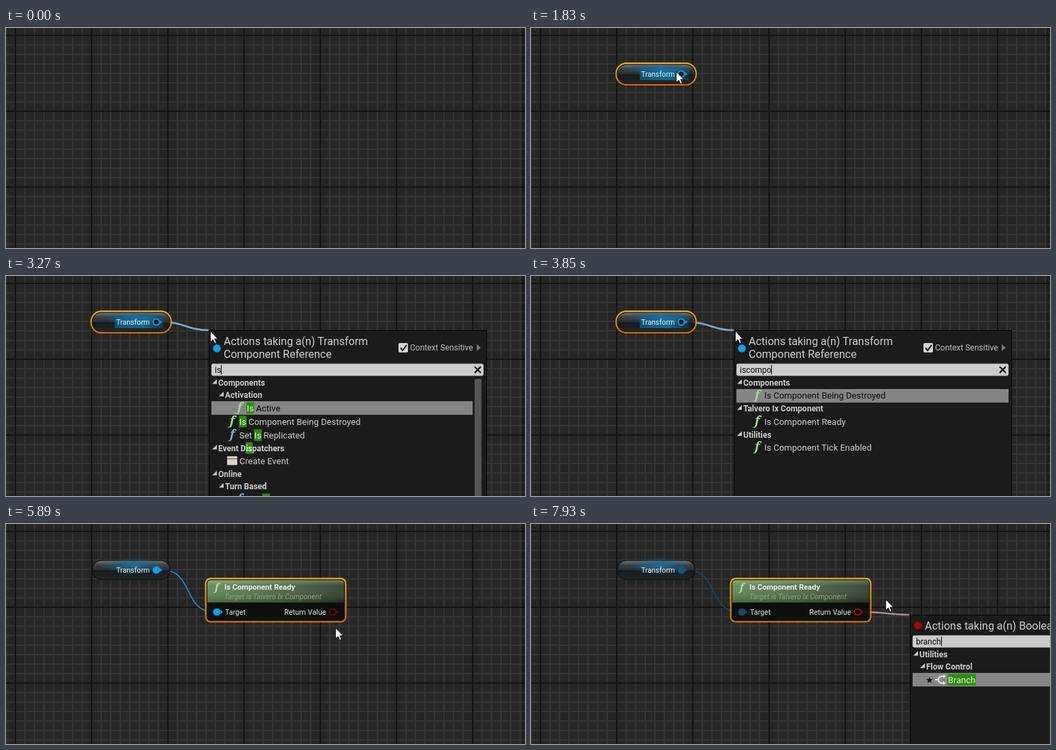
Write an HTML page that moves like this. It is 763 px wide and 325 px high and loops after 8000 ms.

```html
<!DOCTYPE html>
<html lang="en">
<head>
<meta charset="utf-8">
<title>Node graph</title>
<style>
  html, body { margin: 0; width: 100%; height: 100%; overflow: hidden; background: #262626; }
  svg { display: block; font-family: Roboto, sans-serif; }
</style>
</head>
<body>
<svg width="763" height="325" viewBox="0 0 763 325">
  <defs>
    <pattern id="minor" width="14" height="14" patternUnits="userSpaceOnUse" x="-1" y="-4">
      <path d="M1 0V14M0 1H14" stroke="#343434" stroke-width="2"/>
    </pattern>
    <pattern id="major" width="112" height="112" patternUnits="userSpaceOnUse" x="13" y="10">
      <path d="M1 0V112M0 1H112" stroke="#141414" stroke-width="2"/>
    </pattern>
    <linearGradient id="edge" x2="0" y2="1">
      <stop stop-color="#f5ac14"/><stop offset="1" stop-color="#cf6a08"/>
    </linearGradient>
    <linearGradient id="pill" x2="0" y2="1">
      <stop stop-color="#78838a"/><stop offset=".22" stop-color="#3c454a"/>
      <stop offset=".5" stop-color="#272d31"/><stop offset=".52" stop-color="#14181b"/>
      <stop offset="1" stop-color="#23282b"/>
    </linearGradient>
    <radialGradient id="glow">
      <stop stop-color="#1583bb" stop-opacity=".85"/><stop offset=".55" stop-color="#126a9a" stop-opacity=".5"/>
      <stop offset="1" stop-color="#0f5c88" stop-opacity="0"/>
    </radialGradient>
    <linearGradient id="band">
      <stop stop-color="#0f5f8c" stop-opacity=".75"/><stop offset=".6" stop-color="#1279ad" stop-opacity=".8"/>
      <stop offset="1" stop-color="#0e5a84" stop-opacity=".3"/>
    </linearGradient>
    <linearGradient id="head">
      <stop stop-color="#5d8a58"/><stop offset=".5" stop-color="#4a6a45"/><stop offset="1" stop-color="#2f3d2c"/>
    </linearGradient>
    <linearGradient id="gloss" x2="0" y2="1">
      <stop stop-color="#fff" stop-opacity=".28"/><stop offset=".25" stop-color="#fff" stop-opacity=".06"/>
      <stop offset="1" stop-color="#000" stop-opacity=".22"/>
    </linearGradient>
  </defs>
  <rect width="763" height="325" fill="#262626"/>
  <rect width="763" height="325" fill="url(#minor)"/>
  <rect width="763" height="325" fill="url(#major)"/>
  <rect x="758" width="5" height="325" opacity=".2"/>
  <g id="scene"></g>
</svg>
<script>
const LOOP = 8000;
const scene = document.getElementById('scene');
const pen = document.createElement('canvas').getContext('2d');

const HEAD = 'head', FOLDED = 'folded', GREEN = '#9fdc92', BLUE = '#74b4e6';
// rows: [level, kind, label]
const allActions = ['Activation', 'Collision', 'Components', 'Event Dispatchers', 'Online',
  'Talvero Ix Component', 'Tags', 'Utilities', 'Variables'].map(name => [0, FOLDED, name]);
const isActions = [
  [0, HEAD, 'Components'], [1, HEAD, 'Activation'], [2, GREEN, 'Is Active'],
  [1, GREEN, 'Is Component Being Destroyed'], [1, BLUE, 'Set Is Replicated'],
  [0, HEAD, 'Event Dispatchers'], [1, 'event', 'Create Event'],
  [0, HEAD, 'Online'], [1, HEAD, 'Turn Based'], [2, BLUE, 'Get Is My Turn']];
const componentActions = [
  [0, HEAD, 'Components'], [1, GREEN, 'Is Component Being Destroyed'],
  [0, HEAD, 'Talvero Ix Component'], [1, GREEN, 'Is Component Ready'],
  [0, HEAD, 'Utilities'], [1, GREEN, 'Is Component Tick Enabled']];
const boolActions = ['Add Event', 'Math', 'Utilities', 'Variables'].map(name => [0, FOLDED, name]);
const branchActions = [[0, HEAD, 'Utilities'], [1, HEAD, 'Flow Control'], [2, 'branch', 'Branch']];

const objectMenu = { x: 298, y: 80, dot: '#0ba1ee', title: ['Actions taking a(n) Transform', 'Component Reference'] };
const boolMenu = { x: 557, y: 134, dot: '#a50505', title: ['Actions taking a(n) Boolean'] };
const NEW_NODE = { label: 'Place a new node.', width: 129, color: '#d8d6d0' };
const VARIABLE = { label: 'Transform', width: 96, color: '#0ba1ee' };

const find = (rows, query, selected, scroll = false) => ({ rows, query, selected, scroll, caret: true });
const pull = (x, y) => ({ cursor: [x, y], wire: [x, y], tip: NEW_NODE });

// Each step changes part of the state left by the steps before it.
const steps = [
  [0, {}],
  [390, { cursor: [111, 74], tip: VARIABLE }],
  [590, { cursor: [115, 66] }],
  [790, { cursor: [118, 58] }],
  [1010, { cursor: null, tip: null }],
  [1410, { getter: true, cursor: [150, 46] }],
  [1610, { cursor: [200, 58] }],
  [1830, { cursor: [213, 64] }],
  [2030, pull(246, 71)],
  [2230, pull(298, 80)],
  [2430, { menu: objectMenu, tip: null, cursor: null, search: find(allActions, '', -1) }],
  [2630, { cursor: [300, 81] }],
  [3050, { search: find(isActions, 'i', 2, true) }],
  [3270, { search: find(isActions, 'is', 2, true) }],
  [3450, { search: find(componentActions, 'isc', 1) }],
  [3650, { search: find(componentActions, 'iscom', 1) }],
  [3850, { search: find(componentActions, 'iscompo', 1) }],
  [4270, { search: { ...find(componentActions, 'iscompo', 1), caret: false } }],
  [4670, { search: find(componentActions, 'iscompo', 1) }],
  [4870, { search: find(componentActions, 'iscompo', 3) }],
  [5070, { menu: null, wire: null, check: true, fresh: true }],
  [5270, { fresh: false }],
  [5890, { cursor: [484, 153] }],
  [6090, { cursor: [480, 129] }],
  [6310, pull(508, 131)],
  [6510, pull(540, 133)],
  [6710, pull(556, 134)],
  [6910, { menu: boolMenu, tip: null, cursor: null, search: find(boolActions, '', -1) }],
  [7110, { cursor: [521, 111] }],
  [7310, { search: find(branchActions, 'br', 2) }],
  [7530, { search: find(branchActions, 'bran', 2) }],
  [7730, { search: find(branchActions, 'branc', 2) }],
  [7930, { search: find(branchActions, 'branch', 2) }],
];

const rect = (x, y, w, h, fill, more = '') =>
  `<rect x="${x}" y="${y}" width="${w}" height="${h}" fill="${fill}" ${more}/>`;
const path = (d, more) => `<path d="${d}" ${more}/>`;
const text = (x, y, label, size, fill, more = '') =>
  `<text x="${x}" y="${y}" font-size="${size}" fill="${fill}" ${more}>${label}</text>`;
const glyph = (x, y, size, fill) =>
  text(x, y, 'f', size, fill, 'font-family="Noto Serif, serif" font-style="italic" font-weight="600"');

function widthOf(label, size, weight = 400) {
  pen.font = `${weight} ${size}px Roboto, sans-serif`;
  return pen.measureText(label).width;
}

function pin(x, y, color, filled) {
  return `<circle cx="${x}" cy="${y}" r="${filled ? 5.5 : 4.5}" fill="${filled ? color : '#0a0c0d'}"
    stroke="${color}" stroke-width="${filled ? 0 : 2}"/>` +
    path(`M${x + 5.5} ${y - 3}L${x + 9} ${y}L${x + 5.5} ${y + 3}Z`, `fill="${color}"`);
}

function drawGetter({ check, wire }) {
  const selected = !check;
  const color = check && wire ? '#11577c' : '#0b9fe8';
  return rect(127, 54, 114, 28, 'url(#pill)', 'rx="13" stroke="#0a0a0a" fill-opacity=".93"') +
    '<ellipse cx="188" cy="62" rx="46" ry="13" fill="url(#glow)" opacity=".8"/>' +
    (selected ? rect(160, 60, 72, 17, 'url(#band)') +
      rect(125.2, 52.2, 117.6, 31.6, 'none', 'rx="15" stroke="url(#edge)" stroke-width="2.2"') : '') +
    text(162, 72, 'Transform', 10.7, '#eef2f4') + pin(221, 68, color, check);
}

function drawCheck({ wire }) {
  return rect(295, 82, 203, 61, '#0b0e0b', 'rx="6" fill-opacity=".92"') +
    ['url(#head)', 'url(#gloss)'].map(fill => path('M296 116V88Q296 83 301 83H492Q497 83 497 88V116Z', `fill="${fill}"`)).join('') +
    rect(293.6, 80.6, 205.8, 63.8, 'none', 'rx="7" stroke="url(#edge)" stroke-width="2.2"') +
    glyph(307, 98, 15, '#b9d8b0') +
    text(321, 97, 'Is Component Ready', 11.2, '#f0f2ee', 'font-weight="700"') +
    text(321, 111, 'Target is Talvero Ix Component', 10.7, '#93a373', 'font-style="italic"') +
    pin(310, 130, wire ? '#114a69' : '#0b9fe8', true) +
    text(322, 134, 'Target', 10.7, '#e4e6e4') +
    text(409, 134, 'Return Value', 10.9, '#e4e6e4') +
    pin(480, 130, wire ? '#a50808' : '#5e0b08', false);
}

function drawWires({ check, fresh, wire }) {
  let out = '';
  if (check) out += path('M230 68C276 68 260 130 306 130',
    `fill="none" stroke="${wire ? '#164a66' : '#1a93d4'}" stroke-width="${fresh ? 2.6 : 1.6}"`);
  if (wire) {
    const [x, y] = wire, x0 = check ? 489 : 230, y0 = check ? 130 : 68, bend = (x - x0) * .45;
    out += path(`M${x0} ${y0}C${x0 + bend} ${y0} ${x - bend} ${y} ${x} ${y}`,
      `fill="none" stroke="${check ? '#ad8a8d' : '#7fa9ca'}" stroke-width="2.6"`);
  }
  return out;
}

function drawTip({ tip, cursor: [x, y] }) {
  const left = x + 15, top = y + 15;
  return rect(left + .5, top + .5, tip.width - 1, 25, '#151515', 'stroke="#000"') +
    rect(left + 11, top + 6, 15, 14, tip.color, 'rx="3"') +
    rect(left + 11, top + 6, 15, 4, '#fff', 'rx="2" opacity=".4"') +
    text(left + 29, top + 17, tip.label, 12, '#d6d6d6');
}

function rowIcon(kind, x, y) {
  if (kind === 'event') return rect(x - 18, y - 7, 15, 13, '#d9d5c4', 'rx="1"') + rect(x - 18, y - 4, 15, 1.5, '#77736a');
  if (kind === 'branch') return text(x - 33, y + 5, '★', 13, '#111', 'font-family="DejaVu Sans, sans-serif"') +
    path(`M${x - 19} ${y}h5m9 -5h-4q-5 0 -5 5t5 5h4`, 'fill="none" stroke="#e6e6e6" stroke-width="2"') +
    path(`M${x - 7} ${y - 8}l4 3l-4 3zm0 10l4 3l-4 3z`, 'fill="#e6e6e6"');
  return glyph(x - 14, y + 5, 18, kind);
}

function drawRows({ rows, query, selected, scroll }, left, top) {
  let out = '', y = top;
  rows.forEach(([level, kind, label], i) => {
    const heading = kind === HEAD || kind === FOLDED, chosen = i === selected;
    const height = heading ? 18.3 : 20, mid = y + height / 2;
    const x = left + (heading ? 14 + level * 10 : 34 + level * 11);
    const size = heading ? 12 : 13, weight = heading ? 700 : 400;
    if (chosen) out += rect(left + 4, Math.round(y), scroll ? 384 : 400, 20, '#858585');
    if (kind === HEAD) out += path(`M${x - 2} ${mid - 5}v7h-7z`, 'fill="#c4c4c4"');
    else if (kind === FOLDED) out += path(`M${x - 8} ${mid - 4}l5 4l-5 4z`, 'fill="#8c8c8c"');
    else out += rowIcon(kind, x, mid);
    let body = label;
    const at = query ? label.toLowerCase().indexOf(query) : -1;
    if (at >= 0) {
      const hit = label.slice(at, at + query.length);
      out += rect(x + widthOf(label.slice(0, at), size, weight) - .5, mid - 8.5, widthOf(hit, size, weight) + 1, 17, '#2a8f0c');
      body = label.slice(0, at) + `<tspan fill="#e4efdf">${hit}</tspan>` + label.slice(at + query.length);
    }
    out += text(x, mid + 4.6, body, size, chosen ? '#080808' : '#cdcdcd', `font-weight="${weight}"`);
    y += height;
  });
  return out;
}

function drawMenu({ menu: { x, y, dot, title }, search }) {
  const extra = (title.length - 1) * 19, field = y + 31 + extra, mid = y + 16 + extra * .58;
  const { query, caret } = search;
  return rect(x + .5, y + .5, 408, 330, '#1b1b1b', 'stroke="#050505"') +
    `<circle cx="${x + 12}" cy="${mid}" r="5.8" fill="${dot}"/>` +
    title.map((line, i) => text(x + 22, y + 22 + i * 18.5, line, 16, '#cecece')).join('') +
    rect(x + 279, mid - 8, 14, 14, '#d4d4d4', 'rx="2"') +
    path(`M${x + 282} ${mid - 1}l3 4l6 -8`, 'fill="none" stroke="#151515" stroke-width="2"') +
    text(x + 296, mid + 3, 'Context Sensitive', 12, '#bebebe') +
    path(`M${x + 394} ${mid - 6}l6 5l-6 5z`, 'fill="#777"') +
    rect(x + 4, field - .5, 400, 18, '#cbcacc', 'rx="3"') +
    (query
      ? text(x + 9, field + 13, query, 12, '#080808') +
        path(`M${x + 391} ${field + 4}l9 9m0 -9l-9 9`, 'stroke="#080808" stroke-width="2.2"')
      : text(x + 9, field + 13, 'Search', 12, '#777', 'font-style="italic"')) +
    (caret ? rect(Math.round(x + 9 + widthOf(query, 12)), field + 1.5, 1, 14, '#000') : '') +
    drawRows(search, x, field + 18.4) +
    (search.scroll ? rect(x + 391, field + 22, 10, 200, '#555', 'rx="2"') : '');
}

function drawCursor([x, y]) {
  return path('M.5 .5V16.5L4.3 13L6.8 18.6L9.2 17.5L6.8 12H11.5Z',
    `transform="translate(${x} ${y})" fill="#fff" stroke="#111" stroke-width=".9"`);
}

function draw(state) {
  scene.innerHTML = drawWires(state) +
    (state.getter ? drawGetter(state) : '') +
    (state.check ? drawCheck(state) : '') +
    (state.menu ? drawMenu(state) : '') +
    (state.tip ? drawTip(state) : '') +
    (state.cursor ? drawCursor(state.cursor) : '');
}

let shown = -1;
const start = performance.now();
function tick() {
  const time = (performance.now() - start) % LOOP;
  const index = steps.filter(([at]) => at <= time).length - 1;
  if (index !== shown) {
    shown = index;
    draw(Object.assign({}, ...steps.slice(0, index + 1).map(([, change]) => change)));
  }
  requestAnimationFrame(tick);
}
tick();
</script>
</body>
</html>
```
